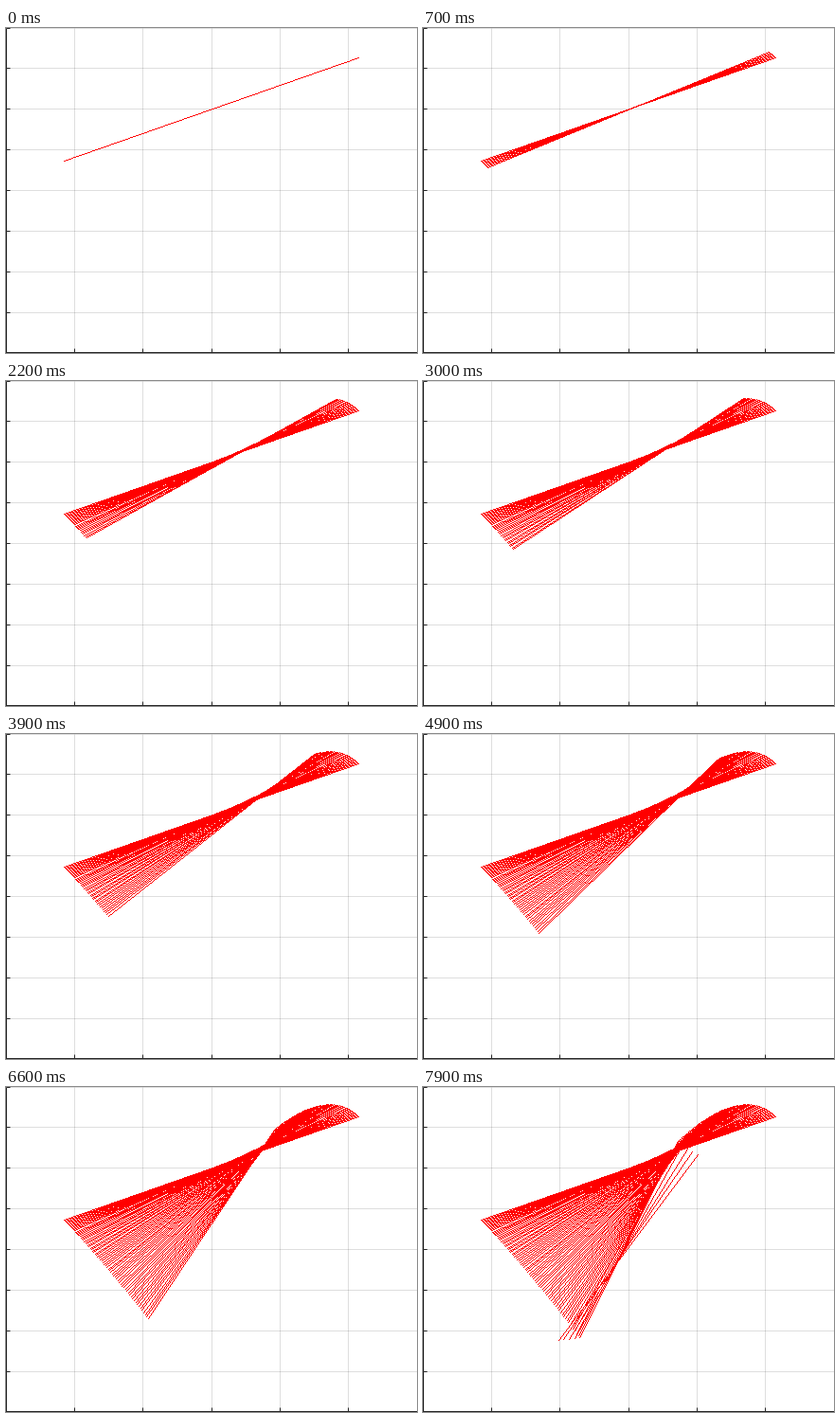
A matplotlib script for the animation above (8 s loop, 434 px wide and 343 px high).

```python
import numpy as np
import matplotlib.pyplot as plt
from matplotlib.animation import FuncAnimation

W, H, DPI = 434, 343, 100
STEPS = 80
PX = 72 / DPI                      # one pixel in points
UX, UY = 72.2, 42.86               # pixels per grid unit
HALF = 2.5                         # half of the rod, grid units
HIT = 75                           # step at which the rod strikes the floor
GRAVITY = 0.0267                   # pixels per step squared
INK = "#262626"


def rod_ends(n):
    """Pixels of both ends of the falling, turning rod at step n."""
    after = max(n - HIT, 0)
    free = min(n, HIT)
    angle = np.radians(30) + 0.01 * (free + 1) - 0.033 * after
    drop = GRAVITY / 2 * free * (free + 1)
    drop += 1.85 * after + GRAVITY / 2 * after * (after - 1)
    cx, cy = 0.3 + 3 * UX, H - 6 * UY + drop
    dx, dy = HALF * UX * np.cos(angle), HALF * UY * np.sin(angle)
    ends = [(cx - dx, cy + dy), (cx + dx, cy - dy)]
    return np.floor(ends).astype(int)


def hard_line(a, b):
    """Columns and rows of a one pixel wide line without smoothing."""
    t = np.linspace(0, 1, np.abs(b - a).max() + 1)
    x, y = np.floor(a[:, None] + (b - a)[:, None] * t + 0.5).astype(int)
    return x, y


# step at which each pixel is first covered by the rod
born = np.full((H, W), STEPS)
for n in reversed(range(STEPS)):
    x, y = hard_line(*rod_ends(n))
    born[y, x] = n

fig = plt.figure(figsize=(W / DPI, H / DPI), dpi=DPI, facecolor="white")
ax = fig.add_axes([0, 0, 1, 1])
ax.axis("off")

red = np.zeros((H, W, 4), np.uint8)
red[..., 0] = 255
trail = ax.imshow(red, extent=(0, W, H, 0), interpolation="nearest",
                  aspect="auto", zorder=2)
ax.set(xlim=(0, W), ylim=(H, 0))


def rule(x, y, z, alpha=1):
    ax.plot(x, y, color=INK, alpha=alpha, lw=PX, snap=True, zorder=z,
            solid_capstyle="butt")


for c in [int(0.5 + UX * i) for i in range(1, 6)]:
    rule([c, c], [0, H], 1, 0.15)
    rule([c, c], [H - 5, H], 3)
for r in [int(H - UY * j) for j in range(1, 9)]:
    rule([0, W], [r, r], 1, 0.15)
    rule([0, 4], [r, r], 3)
rule([0, 0], [0, H], 3)
rule([0, W], [H - 1, H - 1], 3)


def draw(i):
    red[..., 3] = np.where(born <= i, 255, 0)
    trail.set_data(red)
    return trail,


anim = FuncAnimation(fig, draw, frames=STEPS, interval=100,
                     repeat=True, repeat_delay=0)
plt.show()
```
